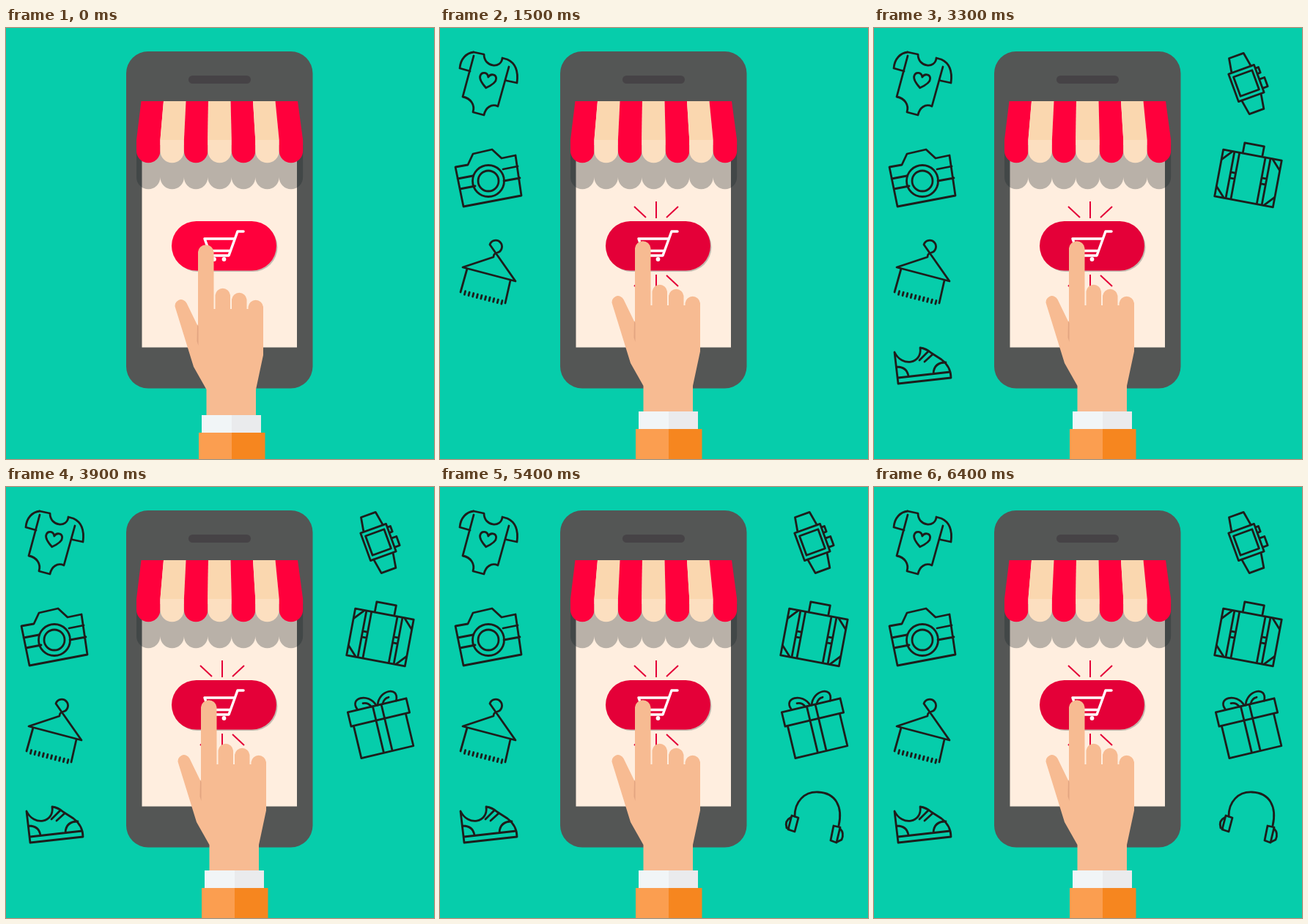
An HTML page with a canvas for the animation above (7400 ms loop, 584x589 px).

```html
<!DOCTYPE html>
<html lang="en">
<head>
<meta charset="utf-8">
<title>Mobile shop</title>
<style>
html, body { margin: 0; width: 100%; height: 100%; overflow: hidden; background: #06cdab; }
canvas { display: block; }
</style>
</head>
<body>
<canvas id="stage" width="584" height="589"></canvas>
<script>
const ctx = document.getElementById('stage').getContext('2d');
const LOOP = 7400;
const COLOR = {
  back: '#06cdab', phone: '#545655', speaker: '#464346', screen: '#ffeedf',
  red: '#ff003c', pressed: '#e40038', cream: '#fad7af', creamLow: '#fcdfc0',
  skin: '#f7bb92', ink: '#1d1d1b'
};

function fill(path, color) {
  ctx.fillStyle = color;
  ctx.fill(new Path2D(path));
}

function stroke(path, color, width) {
  ctx.strokeStyle = color;
  ctx.lineWidth = width;
  ctx.stroke(new Path2D(path));
}

function box(x, y, w, h, color, r = 0) {
  ctx.fillStyle = color;
  ctx.beginPath();
  ctx.roundRect(x, y, w, h, r);
  ctx.fill();
}

function disc(x, y, r, color) {
  ctx.fillStyle = color;
  ctx.beginPath();
  ctx.arc(x, y, r, 0, Math.PI * 2);
  ctx.fill();
}

// Runs draw in a frame moved to (x, y) and turned by some degrees.
function placed(x, y, degrees, draw) {
  ctx.save();
  ctx.translate(x, y);
  ctx.rotate(degrees * Math.PI / 180);
  draw();
  ctx.restore();
}

const line = path => stroke(path, COLOR.ink, 2.8);

function bodysuit() {
  line('M46 33L60 36C60 54 84 56 85 41L92 43C103 48 107 60 105 75L91 72' +
    'M46 33C36 34 28 42 27 55L41 59M46 38L31 94C42 96 48 105 45 115L60 119C62 109 70 103 79 107L94 53');
  placed(65, 71, 12, () =>
    line('M0 11C-8 5 -12 0 -11 -4C-10 -10 -2 -10 0 -4C2 -10 10 -10 11 -4C12 0 8 5 0 11Z'));
}

function camera() {
  line('M21 190L38 187L45 172L71 166L84 178L103 174L111 229L32 244Z' +
    'M24 206L45 202M27 220L48 216M86 193L106 189M87 209L109 205');
  line('M87.5 209a21.5 21.5 0 1 0 -43 0a21.5 21.5 0 1 0 43 0M80 209a14 14 0 1 0 -28 0a14 14 0 1 0 28 0');
}

function hanger() {
  line('M68 296A8.5 8.5 0 1 1 78 307Q73 308 73 313L31 327L103 346ZM37 329L28 361M96 345L89 376');
  for (let i = 0; i < 10; i++) {
    const x = 34 + i * 5.6, y = 362 + i * 1.42;
    line(`M${x + 0.6} ${y - 2.3}L${x - 0.6} ${y + 2.3}`);
  }
}

function shoe() {
  line('M28 443L33 486L105 478Q105 463 92 453L78 444Q71 438 63 437C66 459 38 464 28 443Z' +
    'M33 478L104 470M31 463Q45 463 47 476M81 472Q82 457 98 457M62 454L74 442M69 456L80 446');
}

function watch() {
  placed(508, 75.5, -20, () =>
    line('M-18.5 -20H18.5V20H-18.5ZM-13.5 -14H13.5V14H-13.5Z' +
      'M-14 -20L-10.5 -40H10.5L14 -20M-14 20L-10.5 41H10.5L14 20' +
      'M18.5 -15H23V-7H18.5M18.5 1H26V14H18.5'));
}

function suitcase() {
  placed(510.5, 205.5, 10.6, () => {
    line('M-40.5 -32.5H40.5V32.5H-40.5ZM-13.5 -32.5V-47H13.5V-32.5');
    for (const side of [-1, 1]) {
      line(`M${side * 25} -32V32M${side * 18} -32V32M${side * 25} -4H${side * 18}M${side * 25} 4H${side * 18}`);
      line(`M${side * 40} -19L${side * 28} -32M${side * 40} 19L${side * 28} 32`);
    }
  });
}

function gift() {
  placed(508.5, 308, -13.4, () => {
    line('M-41 -10H41V10H-41ZM-37.5 10V55.5H35.5V10M-6 -10V55.5M6 -10V55.5');
    for (const side of [-1, 1]) {
      line(`M${side} -10C${side * 7} -30 ${side * 36} -29 ${side * 27} -10M${side * 8} -10Q${side * 11} -17 ${side * 18} -17`);
    }
  });
}

function headphones() {
  line('M484 450C484 430 497 416 516 417C540 418 550 437 544 463');
  line('M480 449L489 452L484 471L475 468ZM478 452Q470 456 473 466L476 467');
  line('M537 463L546 465L541 486L533 483ZM546 467Q552 473 548 482L542 485');
}

const icons = [bodysuit, camera, hanger, shoe, watch, suitcase, gift, headphones];

function phone() {
  box(164, 32, 254.5, 460.5, COLOR.phone, 30);
  box(249, 65, 85, 11, COLOR.speaker, 5.5);
  box(185.5, 100, 211.5, 336.5, COLOR.screen);
}

function awning() {
  const low = i => 178 + i * 32.45, high = i => 184.5 + i * 30.5;
  let shade = 'M178 160V204';
  for (let i = 0; i < 7; i++) shade += `A16.22 16.22 0 0 0 ${low(i + 1)} 204`;
  fill(shade + 'V160Z', 'rgba(25,38,40,.3)');
  for (let i = 0; i < 7; i++) {
    const even = i % 2 === 0;
    fill(`M${high(i)} 100H${high(i + 1)}L${low(i + 1)} 153H${low(i)}Z`, even ? COLOR.red : COLOR.cream);
    fill(`M${low(i)} 153H${low(i + 1)}V168A16.22 16.22 0 0 1 ${low(i)} 168Z`, even ? COLOR.red : COLOR.creamLow);
  }
}

function button(pressed) {
  box(228, 266, 142.5, 67, '#c3bab0', 33.5);
  box(226, 264, 143, 67.5, pressed ? COLOR.pressed : COLOR.red, 33.7);
  stroke('M324 278H316L304 311H277M271 288H311M271 288L277 304.5H306', '#fff', 3.5);
  disc(284, 316, 2.9, '#fff');
  disc(297.5, 316, 2.9, '#fff');
}

function rays() {
  stroke('M265 244L281 259M295 237V260M325 244L309 259M265 353L281 338M295 337V360M325 353L309 338',
    COLOR.pressed, 2);
}

function hand() {
  fill('M262 306A10.8 10.8 0 0 1 283.5 306V384H285.5V365A10.3 10.3 0 0 1 306 365V384H308V371' +
    'A10.3 10.3 0 0 1 328.5 371V384H330.5V381A10.3 10.3 0 0 1 351 381V447L341 494V530H273.5V494' +
    'L256 463L231.3 383A8.2 8.2 0 0 1 246.5 376L262 408Z', COLOR.skin);
  fill('M261 405L262.5 408V434L260.5 428Z', '#e3a581');
  box(267, 529, 41, 24, '#f1f5f7');
  box(308, 529, 40, 24, '#eaebed');
  box(263, 553, 45, 50, '#fb9e50');
  box(308, 553, 45.5, 50, '#f6861f');
}

function stateAt(t) {
  if (t < 4500) {
    return { pressed: Math.floor(t / 300) % 2 === 1, shown: Math.floor((t + 300) / 600) };
  }
  const pressed = t < 4900 || (t >= 5400 && t < 5900) || t >= 6400;
  return { pressed, shown: pressed ? icons.length : 0 };
}

function render(now) {
  const { pressed, shown } = stateAt(now % LOOP);
  ctx.lineCap = 'butt';
  ctx.lineJoin = 'round';
  box(0, 0, 584, 589, COLOR.back);
  phone();
  awning();
  if (pressed) rays();
  ctx.lineCap = 'round';
  button(pressed);
  for (const icon of icons.slice(0, shown)) icon();
  placed(pressed ? 4 : 0, pressed ? -5 : 0, 0, hand);
  requestAnimationFrame(render);
}

render(performance.now());
</script>
</body>
</html>
```
